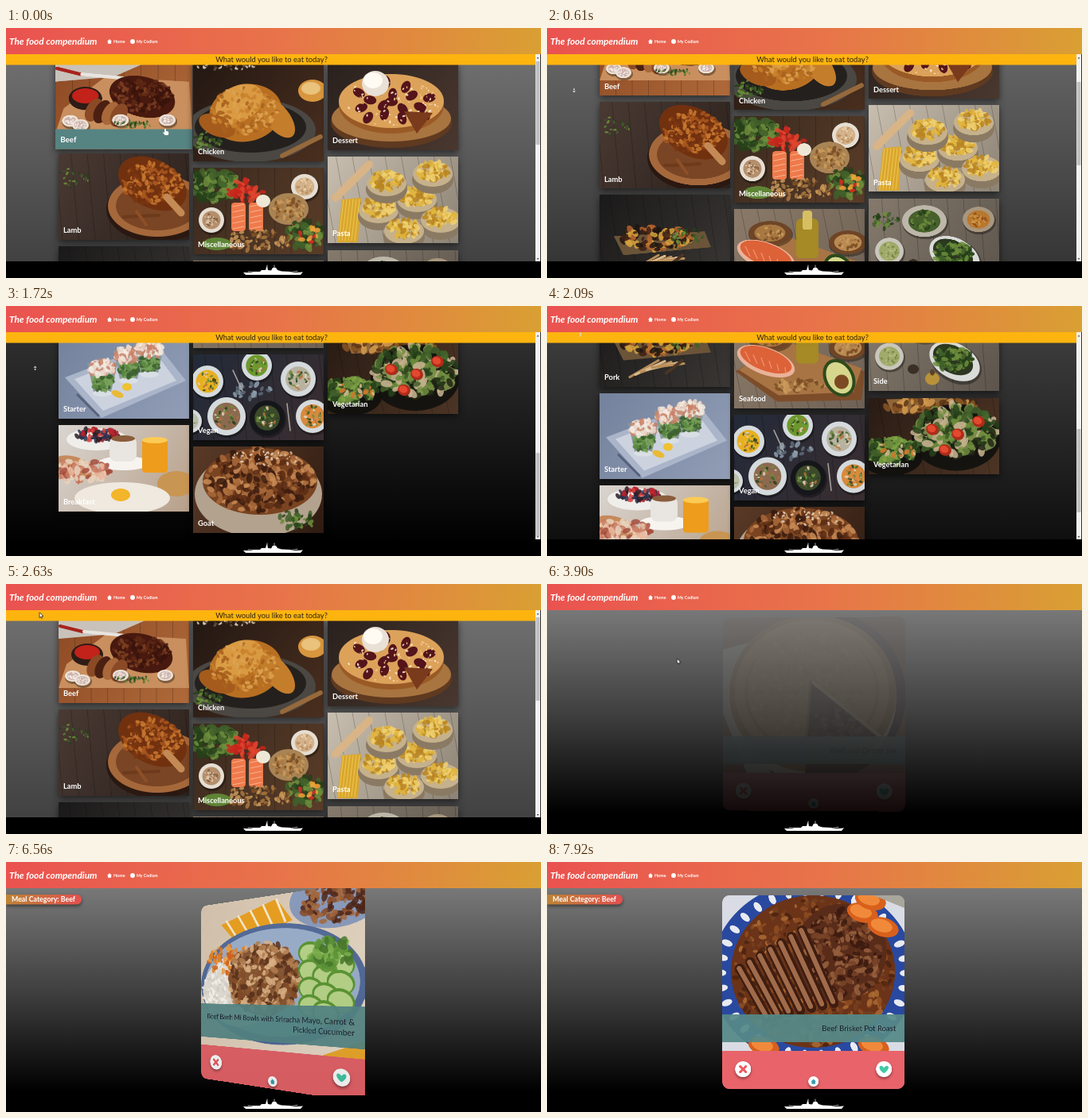
Animation, 672 px wide and 315 px high, one loop 7990 ms. Source, as an HTML page with a canvas:

```html
<!DOCTYPE html>
<html lang="en">
<head>
<meta charset="utf-8">
<title>The food compendium</title>
<style>
html, body { margin: 0; width: 100%; height: 100%; overflow: hidden; background: #000; }
canvas { display: block; width: 672px; height: 315px; }
</style>
</head>
<body>
<canvas id="stage"></canvas>
<script>
const W = 672, H = 315, LOOP = 7990, TOP = 33, FOOT = 294, SCALE = 2;
const FONT = 'Lato, "Open Sans", sans-serif';
const stage = document.getElementById('stage');
const dpr = Math.max(1, window.devicePixelRatio || 1);
stage.width = W * dpr;
stage.height = H * dpr;
const screen = stage.getContext('2d');
screen.scale(dpr, dpr);
let g = screen, seed = 1;

// --- drawing helpers, all on the current context g ---
function rnd() { seed = seed * 16807 % 2147483647; return seed / 2147483647; }
function box(color, x, y, w, h, r = 0) {
  g.fillStyle = color;
  g.beginPath();
  g.roundRect(x, y, w, h, r);
  g.fill();
}
function oval(color, x, y, rx, ry = rx, turn = 0) {
  g.fillStyle = color;
  g.beginPath();
  g.ellipse(x, y, rx, ry, turn, 0, 7);
  g.fill();
}
function poly(color, ...p) {
  g.fillStyle = color;
  g.beginPath();
  for (let i = 0; i < p.length; i += 2) g.lineTo(p[i], p[i + 1]);
  g.closePath();
  g.fill();
}
function line(color, width, x1, y1, x2, y2) {
  g.strokeStyle = color;
  g.lineWidth = width;
  g.lineCap = 'round';
  g.beginPath();
  g.moveTo(x1, y1);
  g.lineTo(x2, y2);
  g.stroke();
}
function shade(x1, y1, x2, y2, ...colors) {
  const s = g.createLinearGradient(x1, y1, x2, y2);
  colors.forEach((c, i) => s.addColorStop(i / (colors.length - 1), c));
  return s;
}
function specks(colors, n, x, y, rx, ry, size) {
  g.globalAlpha = 0.85;
  for (let i = 0; i < n * 2; i++) {
    const a = rnd() * 6.283, d = Math.sqrt(rnd()), s = size * (0.35 + rnd() * 0.5);
    oval(colors[i % colors.length], x + Math.cos(a) * d * rx, y + Math.sin(a) * d * ry, s, s * 0.6, rnd() * 3.14);
  }
  g.globalAlpha = 1;
}
function bowl(rim, food, bits, x, y, rx, ry = rx) {
  oval('rgba(0,0,0,.35)', x + 1, y + 2, rx + 1, ry + 1);
  oval(rim, x, y, rx, ry);
  oval(food, x, y, rx * 0.72, ry * 0.72);
  specks(bits, 16, x, y, rx * 0.6, ry * 0.6, rx * 0.15);
}
function planks(a, b, w, h, slant = 0) {
  box(shade(0, 0, w, h, a, b), 0, 0, w, h);
  for (let i = 0; i < 9; i++) line('rgba(0,0,0,.25)', 0.8, i * w / 8 - slant, 0, i * w / 8 + slant, h);
}
function write(str, x, y, size, color, weight = 400, align = 'left') {
  g.font = `${weight} ${size}px ${FONT}`;
  g.fillStyle = color;
  g.textAlign = align;
  g.textBaseline = 'middle';
  g.fillText(str, x, y);
}
function sheet(w, h, draw) {
  const c = document.createElement('canvas'), back = g;
  c.width = w * SCALE;
  c.height = h * SCALE;
  g = c.getContext('2d');
  g.scale(SCALE, SCALE);
  seed = 77;
  draw(w, h);
  g = back;
  return c;
}

// --- category pictures ---
const GREENS = ['#41602a', '#6d8d3c', '#26401a'], MEAT = ['#8a4a26', '#4b2012', '#a9683a'];
const NUTS = ['#a87842', '#c99a5c', '#7a4d25'];
const pictures = {
  Beef(w, h) {
    planks('#8d4a25', '#b06a3a', w, h);
    poly('#c9c2ba', 0, 0, 120, 0, 70, 22, 0, 28);
    poly('#c98f5e', 10, 60, 60, 22, 160, 28, 164, 90, 0, 90);
    line('#a8231d', 4, 2, 12, 30, 19);
    line('#e8e4df', 4, 32, 19, 84, 24);
    oval('#2e1c16', 36, 48, 20, 14);
    oval('#c2221a', 36, 45, 16, 9);
    oval('#48190f', 104, 46, 40, 24, 0.25);
    specks(['#5d2814', '#3a140c', '#7d4022'], 70, 104, 44, 36, 20, 5);
    for (let i = 0; i < 4; i++) oval(MEAT[i % 3], 46 + i * 10, 62 + i * 2, 9, 15, 0.5);
    for (const [x, y] of [[18, 75], [78, 74], [134, 74], [30, 80]]) bowl('#eee3d8', '#cdb3ad', ['#f8f2ea'], x, y, 10, 7);
    specks(GREENS, 18, 92, 79, 25, 4, 3);
  },
  Lamb(w, h) {
    planks('#4a3a33', '#2c211d', w, h, 5);
    oval('#2a1811', 124, 70, 64, 42);
    oval('#a5683b', 124, 66, 62, 39);
    oval('#7a4524', 124, 66, 52, 31);
    oval('#71310f', 118, 38, 46, 30, 0.5);
    specks(['#a8571f', '#c9792f', '#7a3612'], 90, 118, 38, 38, 26, 5);
    line('#c48a55', 9, 136, 55, 154, 75);
    line('#6d3a1c', 4, 82, 80, 126, 78);
    line('#8d4f27', 4, 98, 73, 110, 90);
    specks(GREENS, 14, 20, 30, 22, 14, 3);
  },
  Pork(w, h) {
    planks('#1b1a1a', '#3a3734', w, h, 8);
    poly('#6b5438', 18, 52, 132, 46, 140, 66, 30, 76);
    specks(['#b4642d', '#d6a23c', '#3d2014', '#1f1512'], 50, 70, 54, 46, 15, 8);
    specks(GREENS, 16, 110, 52, 20, 10, 4);
    for (let i = 0; i < 5; i++) line(i % 2 ? '#d9b98a' : '#b98d5a', 3, 38 + i * 7, 97 - i * 3, 74 + i * 8, 76 + i);
    line('#4a3524', 4, 84, 92, 104, 76);
  },
  Starter(w, h) {
    box(shade(0, 0, w, h, '#74829d', '#929eb6'), 0, 0, w, h);
    poly('#aab5ca', 8, 56, 122, 12, 160, 60, 54, 107);
    poly('#ccd3df', 20, 58, 118, 20, 148, 60, 56, 98);
    for (const [x, y] of [[88, 32], [114, 24], [55, 48]]) {
      poly('#8b9a9c', x - 19, y - 10, x + 19, y - 10, x + 11, y + 26, x - 11, y + 26);
      oval('#d9dfe4', x, y + 28, 12, 4);
      specks(['#5c8a42', '#3d6230', '#7ba35a'], 34, x, y + 13, 13, 11, 6);
      specks(['#ead8cb', '#c9826a', '#f5ebe1'], 46, x, y - 4, 17, 10, 6);
    }
    oval('#f0c232', 86, 68, 6, 5);
    oval('#e9ba35', 74, 77, 8, 4, 0.4);
    line('#56617a', 3, 24, 78, 50, 104);
  },
  Breakfast(w, h) {
    box(shade(0, 0, w, h, '#dad5d0', '#b7a08a'), 0, 0, w, h);
    oval('#f0eeea', 48, 18, 38, 14);
    specks(['#b3202c', '#27304f', '#d8433f', '#2c1d26'], 34, 48, 12, 28, 8, 6);
    oval('#f7f4f0', 82, 48, 32, 9);
    box('#e9e5e0', 64, 14, 34, 32, 9);
    oval('#8b5d3c', 81, 17, 15, 4);
    box('#ee9c1c', 105, 18, 32, 42, 4);
    oval('#fccb55', 121, 19, 16, 4);
    oval('#c58a5c', 20, 52, 26, 12, 0.3);
    specks(['#c97b62', '#e9b79c', '#a44e3d', '#e8d3bd'], 40, 30, 58, 34, 14, 8);
    oval('#c99553', 148, 74, 24, 16);
    oval('#efe9df', 80, 92, 60, 20);
    oval('#f3b529', 78, 88, 12, 8);
  },
  Chicken(w, h) {
    box(shade(0, 0, w, h, '#231813', '#4a2f1f'), 0, 0, w, h);
    specks(['#6b5242', '#d8cbb8'], 20, 40, 7, 38, 5, 3);
    oval('#4b4742', 72, 88, 82, 40);
    oval('#24201d', 72, 84, 70, 32);
    oval('#b86f22', 66, 66, 46, 36, -0.2);
    oval('#d99a42', 58, 54, 32, 22, -0.5);
    oval('#c47d2b', 106, 72, 30, 15, 0.9);
    oval('#a55b1c', 30, 82, 24, 13, 0.4);
    specks(['#dca250', '#a8621f', '#c9812d'], 70, 64, 64, 42, 30, 5);
    oval('#d8963e', 150, 38, 18, 14);
    oval('#e9c27b', 148, 35, 12, 8);
    specks(GREENS, 26, 18, 102, 20, 12, 4);
    line('#96693c', 6, 112, 120, 160, 96);
  },
  Miscellaneous(w, h) {
    planks('#3a2a1f', '#5b3d28', w, h);
    specks(GREENS, 60, 26, 22, 30, 20, 9);
    specks(['#c9251b', '#e2452f'], 18, 66, 30, 22, 14, 7);
    bowl('#e6ded2', '#d4b28a', ['#ead2ae', '#b98d62'], 140, 24, 17, 16);
    bowl('#e6ded2', '#b58f6c', ['#e4cfb0', '#7c573b'], 23, 66, 16, 16);
    oval('#a98455', 120, 52, 25, 20);
    specks(NUTS, 40, 120, 52, 19, 14, 5);
    for (const x of [48, 70]) {
      box('#ef7a4c', x, 44, 18, 36, 4);
      for (let i = 0; i < 5; i++) line('#f8b08d', 1, x + 2, 49 + i * 7, x + 16, 46 + i * 7);
    }
    oval('#eee7d6', 88, 42, 9, 8);
    specks(GREENS, 34, 140, 84, 24, 18, 8);
    specks(['#d42d22', '#e6a438'], 8, 146, 84, 14, 10, 6);
    specks(NUTS, 40, 82, 92, 44, 13, 5);
    oval('#5f8436', 30, 96, 18, 8);
  },
  Seafood(w, h) {
    planks('#8b7a69', '#6f6255', w, h, 12);
    poly('#7d4d2a', 2, 72, 60, 34, 164, 72, 160, 108, 54, 110);
    poly('#a87444', 6, 70, 60, 32, 160, 68, 150, 98, 56, 102);
    bowl('#6e4526', '#a87842', NUTS, 45, 30, 27, 15);
    bowl('#6e4526', '#b98a52', NUTS, 143, 42, 24, 15);
    box('#a58a25', 78, 12, 28, 50, 6);
    box('#d6bf62', 86, 2, 12, 24, 3);
    oval('#e9b39a', 40, 59, 38, 17, 0.35);
    oval('#dd6238', 40, 57, 34, 14, 0.35);
    for (let i = 0; i < 6; i++) line('#ee9470', 1.2, 14 + i * 10, 47 + i * 4, 20 + i * 9, 59 + i * 3);
    oval('#2e4a1c', 132, 80, 19, 25, -0.5);
    oval('#d6d78c', 132, 80, 15, 21, -0.5);
    oval('#7c4a22', 135, 85, 9);
    specks(NUTS, 30, 82, 90, 30, 8, 6);
  },
  Vegan(w, h) {
    planks('#232a39', '#3a2e30', w, h, 6);
    const foods = ['#e8b021', '#6d9a2e', '#b8b2a0', '#8c6a50', '#3c4a2b', '#d98a3c', '#b8bfa8'];
    [[18, 34, 20], [80, 14, 19], [132, 31, 22], [42, 78, 24], [93, 80, 22], [150, 78, 21], [-4, 84, 15]].forEach(([x, y, r], i) => {
      const dark = i === 4;
      bowl(dark ? '#15161a' : '#d5dadd', foods[i], [...GREENS, '#b8703a', '#e0d4b8'], x, y, r);
    });
    specks(['#8fa0ad', '#5d6b79'], 10, 72, 46, 26, 10, 6);
    line('#a8a49d', 1.5, 50, 20, 62, 46);
    line('#a8a49d', 1.5, 118, 62, 122, 96);
  },
  Goat(w, h) {
    box(shade(0, 0, w, h, '#5a3a27', '#2f1c12'), 0, 0, w, h);
    oval('#b3a28e', 82, 60, 80, 54);
    oval('#7a4421', 84, 44, 72, 42);
    specks(['#a8683a', '#5a2c14', '#c98c56', '#3a1b0e'], 130, 84, 42, 68, 40, 8);
    specks(['#e5d5c0', '#d2b695'], 20, 92, 14, 44, 10, 3);
    specks(GREENS, 20, 130, 92, 24, 12, 6);
  },
  Dessert(w, h) {
    box(shade(0, 0, w, h, '#2a211e', '#4a382f'), 0, 0, w, h);
    oval('#5f3a20', 80, 74, 76, 32);
    oval('#a87440', 80, 69, 75, 29);
    oval('#9a5a26', 80, 52, 66, 36);
    oval('#dca25a', 80, 47, 66, 34);
    for (let i = 0; i < 17; i++) {
      const a = i * 2.4, d = Math.sqrt(i / 17);
      oval('#54141a', 80 + Math.cos(a) * d * 56, 48 + Math.sin(a) * d * 27, 8, 5.5, a);
    }
    specks(['#f0c88c', '#fff0d8'], 40, 80, 48, 60, 30, 2.5);
    poly('#7a3a1c', 96, 60, 132, 62, 112, 88);
    oval('#e9e0d6', 60, 25, 17, 16);
    oval('#fffaf2', 57, 21, 12, 10);
  },
  Pasta(w, h) {
    planks('#c9bfb0', '#8d8375', w, h, 10);
    line('#d8b486', 10, 10, 52, 52, 10);
    poly('#d9a62e', 18, 54, 42, 52, 38, 108, 12, 108);
    for (let i = 0; i < 6; i++) line('#f0c850', 1, 20 + i * 4, 54, 14 + i * 4, 106);
    for (const [x, y] of [[64, 66], [112, 52], [142, 78], [96, 92], [74, 32], [132, 20]]) {
      oval('#8b7a63', x, y + 9, 26, 18);
      oval('#c5b18c', x, y + 2, 25, 16);
      specks(['#e0b53f', '#f0d070', '#b98522'], 44, x, y - 2, 20, 12, 6);
    }
  },
  Side(w, h) {
    planks('#857a6c', '#5d554d', w, h, 4);
    bowl('#c9c6bb', '#a0aa6a', ['#b5bb80', '#75833f'], 26, 66, 18, 17);
    oval('rgba(0,0,0,.35)', 110, 75, 34, 24, 0.5);
    oval('#d9dbd8', 108, 72, 34, 22, 0.5);
    oval('#2d3620', 106, 70, 27, 17, 0.5);
    specks(GREENS, 60, 106, 69, 24, 15, 6);
    oval('#b8923a', 80, 94, 9, 8);
    oval('#5b4326', 80, 86, 3, 4);
    oval('#3a3025', 56, 82, 7, 6);
    bowl('#bdb7aa', '#47602c', GREENS, 70, 28, 28, 20);
    bowl('#a8977f', '#b9782f', ['#d09a45', '#8f4b1c'], 138, 26, 20, 16);
    specks(GREENS, 14, 20, 28, 18, 10, 5);
  },
  Vegetarian(w, h) {
    planks('#2a1c14', '#4d3525', w, h, 9);
    poly('#8f6638', 22, 2, 100, 0, 80, 18, 30, 20);
    specks(['#d39a4e', '#8b5523', '#5d3517'], 30, 76, 10, 60, 9, 9);
    oval('#15130f', 110, 50, 56, 42);
    specks([...GREENS, '#82964e', '#cdb594', '#1e2414'], 130, 110, 42, 52, 32, 10);
    for (const [x, y] of [[112, 46], [138, 30], [96, 66], [80, 40]]) {
      oval('#b02a1a', x, y, 8, 7, 0.4);
      oval('#e2492f', x - 1, y - 1, 5.5, 4.5, 0.4);
    }
    oval('#12110e', 28, 74, 40, 24);
    specks([...GREENS, '#7fa544'], 60, 28, 66, 34, 15, 9);
    specks(['#d2752b', '#d8bc94'], 8, 34, 66, 26, 10, 6);
  }
};

const columns = [
  [66, [['Beef', 41, 109], ['Lamb', 158, 109], ['Pork', 275, 109], ['Starter', 392, 108], ['Breakfast', 508, 109]]],
  [235, [['Chicken', 41, 127], ['Miscellaneous', 176, 109], ['Seafood', 293, 118], ['Vegan', 419, 108], ['Goat', 535, 109]]],
  [404, [['Dessert', 45, 109], ['Pasta', 162, 109], ['Side', 280, 109], ['Vegetarian', 398, 96]]]
];
const tiles = columns.flatMap(([x, list]) =>
  list.map(([name, y, h]) => ({ name, x, y, h, w: 164, art: sheet(164, h, pictures[name]) })));

// --- meal cards ---
const CARD = { x: 221, y: 42, w: 229, h: 244 };
function heart(x, y, s, color) {
  g.fillStyle = color;
  g.beginPath();
  g.moveTo(x, y + s);
  g.bezierCurveTo(x - s * 2.2, y - s * 0.5, x - s * 0.8, y - s * 1.7, x, y - s * 0.45);
  g.bezierCurveTo(x + s * 0.8, y - s * 1.7, x + s * 2.2, y - s * 0.5, x, y + s);
  g.fill();
}
function house(x, y, s, color) {
  poly(color, x - s, y, x, y - s, x + s, y, x + s * 0.7, y, x + s * 0.7, y + s * 0.9, x - s * 0.7, y + s * 0.9, x - s * 0.7, y);
}
function button(x, y, r) {
  g.shadowColor = 'rgba(0,0,0,.4)';
  g.shadowBlur = 6;
  g.shadowOffsetY = 4;
  oval('#fff', x, y, r);
  g.shadowColor = 'transparent';
}
function mealCard(lines, picture) {
  return sheet(CARD.w, CARD.h, (w, h) => {
    g.beginPath();
    g.roundRect(0, 0, w, h, 9);
    g.clip();
    picture();
    box('#e8646a', 0, 196, w, 48);
    const band = 35 + 12 * (lines.length - 1);
    box('rgba(86,137,136,.93)', 0, 185 - band, w, band);
    lines.forEach((s, i) => write(s, 218, 168 - 12 * (lines.length - 1 - i), 9.5, '#1d2430', 400, 'right'));
    button(26, 219, 10);
    line('#ee5a5f', 3, 22.5, 215.5, 29.5, 222.5);
    line('#ee5a5f', 3, 29.5, 215.5, 22.5, 222.5);
    button(203, 219, 10);
    heart(203, 219.5, 4.8, '#42c9a5');
    button(114.5, 234.5, 6.5);
    house(114.5, 234.8, 3.3, '#3c9fae');
  });
}
const meals = [
  mealCard(['Beef and Oyster pie'], () => {
    box(shade(0, 0, 229, 196, '#7a4a2c', '#8f5531'), 0, 0, 229, 196);
    poly('#5a301c', 150, 0, 229, 0, 229, 60);
    poly('#cfc7c0', 0, 40, 40, 30, 60, 196, 30, 196, 0, 120);
    oval('#2a1713', 124, 98, 106, 106);
    oval('#e0d2bd', 112, 102, 106, 104);
    oval('#b57330', 113, 96, 105, 99);
    oval('#d29a4c', 112, 93, 97, 90);
    oval('#b87a33', 112, 94, 84, 78);
    oval('#d8a355', 112, 92, 81, 76);
    specks(['#e3b76e', '#c58a40', '#dca75a'], 170, 104, 85, 74, 66, 5);
    poly('#3b1a10', 111, 80, 196, 152, 170, 196, 104, 196);
    specks(['#5d2b18', '#251009', '#83482a'], 70, 142, 146, 32, 34, 7);
    line('#ecc887', 4, 111, 80, 198, 150);
    line('#9c622c', 3, 111, 80, 105, 160);
  }),
  mealCard(['Beef Banh Mi Bowls with Sriracha Mayo, Carrot &', 'Pickled Cucumber'], () => {
    box(shade(0, 0, 229, 196, '#dac7b0', '#eee0cd'), 0, 0, 229, 196);
    poly('#f0a21c', 35, 30, 120, 5, 142, 34, 62, 58);
    for (let i = 0; i < 5; i++) line('#fff0d2', 3, 44 + i * 19, 26 - i * 5, 64 + i * 17, 54 - i * 5);
    oval('#8b9dbf', 194, 14, 56, 34);
    specks(MEAT, 60, 196, 16, 44, 25, 8);
    oval('#536c9c', 116, 112, 116, 76);
    oval('#9eb2d0', 116, 110, 108, 68);
    oval('#e9e4dc', 62, 120, 58, 48);
    specks(['#fffdf5', '#ded8cb'], 60, 36, 120, 34, 34, 5);
    specks(['#ef8524', '#d9661a', '#f4a346'], 40, 48, 78, 34, 20, 7);
    oval('#8a5732', 100, 106, 52, 46);
    specks(['#5d3219', '#8a4f28', '#b98250', '#e5b98a'], 150, 100, 104, 54, 46, 8);
    for (let i = 0; i < 11; i++) {
      const x = 166 + i % 3 * 18, y = 76 + i * 7;
      oval('#5c9a32', x, y, 17, 14, 0.4);
      oval('#bcd98a', x, y + 1, 14.5, 11.5, 0.4);
    }
    specks(['#5f9a35', '#82b84e', '#477a28'], 30, 190, 78, 24, 18, 10);
    poly('#efab2c', 180, 196, 229, 176, 229, 196);
  }),
  mealCard(['Beef Brisket Pot Roast'], () => {
    box('#d9dce4', 0, 0, 229, 196);
    oval('#2949a0', 114, 98, 128, 116);
    for (let i = 0; i < 34; i++) {
      const a = i * 0.185;
      oval('#e8eaf2', 114 + Math.cos(a) * 116, 98 + Math.sin(a) * 104, 7, 4, a);
    }
    oval('#6b3318', 114, 96, 103, 96);
    specks(['#8d4d22', '#ab6a33', '#4d2310', '#75401f'], 260, 114, 98, 100, 92, 7);
    oval('#592c1a', 148, 72, 58, 62, 0.3);
    specks(['#7a4429', '#3c1b10', '#96603d'], 130, 150, 74, 50, 56, 7);
    for (let i = 0; i < 7; i++) {
      line('#3f1d10', 12, 22 + i * 13, 92 - i * 8, 56 + i * 14, 154 - i * 3);
      line('#a06b4b', 6, 21 + i * 13, 92 - i * 8, 55 + i * 14, 152 - i * 3);
    }
    for (const [x, y] of [[176, 22], [202, 40], [186, 6], [52, 190], [190, 190]]) {
      oval('#d9601c', x, y, 20, 12, 0.3);
      oval('#f08a3a', x - 2, y - 2, 14, 8, 0.3);
    }
    poly('#a9a69c', 190, 0, 229, 0, 229, 16);
  })
];

// --- motion ---
const clamp = v => Math.max(0, Math.min(1, v));
const span = (t, a, b) => clamp((t - a) / (b - a));
const ease = v => v * v * (3 - 2 * v);
function track(keys, t) {
  let i = 0;
  while (i < keys.length - 2 && t > keys[i + 1][0]) i++;
  const [a, b] = [keys[i], keys[i + 1]], k = span(t, a[0], b[0]);
  return a.slice(1).map((v, n) => v + (b[n + 1] - v) * k);
}
const scrollKeys = [[0, 0], [300, 0], [600, 60], [1100, 277], [1350, 358], [1800, 358], [2090, 283], [2630, 0]];
const mouseKeys = [
  [0, 200, 130], [60, 200, 130], [300, 60, 85], [450, 34, 72], [1100, 34, 99], [1540, 34, 99], [2090, 42, 36],
  [2630, 42, 36], [2830, 42, 44], [3100, 145, 92], [3570, 162, 95], [3700, 163, 94], [3900, 163, 94],
  [4640, 390, 188], [5030, 390, 188], [5450, 414, 200], [5560, 424, 258]
];
// each spin: card, start, end, fading in or out
const spins = [
  [0, 3870, 4780, true], [0, 5490, 5860, false], [1, 5860, 6370, true],
  [1, 6460, 7050, false], [2, 7050, 7930, true]
];

function drawTile(tile, scroll, hover) {
  const y = tile.y - scroll, s = 1 + 0.05 * hover;
  if (y > FOOT + 10 || y + tile.h < TOP) return;
  g.save();
  g.translate(tile.x + tile.w / 2, y + tile.h / 2);
  g.scale(s, s);
  g.translate(-tile.w / 2, -tile.h / 2);
  g.shadowColor = 'rgba(0,0,0,.55)';
  g.shadowBlur = 9;
  g.shadowOffsetY = 3;
  g.drawImage(tile.art, 0, 0, tile.w, tile.h);
  g.shadowColor = 'transparent';
  g.globalAlpha = hover;
  box('#568482', 0, tile.h - 24, tile.w, 24);
  g.globalAlpha = 1;
  write(tile.name, 6, tile.h - 11.5, 9.3, '#fff', 700);
  g.restore();
}

function drawMenu(t) {
  const [scroll] = track(scrollKeys, t);
  const hover = t < 2000 ? 1 - ease(span(t, 60, 330)) : ease(span(t, 2950, 3130));
  box(shade(0, TOP - scroll, 0, 660 - scroll, '#707070', '#000'), 0, TOP, W, FOOT - TOP);
  tiles.forEach(tile => drawTile(tile, scroll, tile.name === 'Beef' ? hover : 0));
  box('#fdb40f', 0, TOP, 665, 13.4);
  write('What would you like to eat today?', 333.5, 40.3, 9.4, '#2a2110', 400, 'center');
  box('#f1f1f1', 665, TOP, 6, FOOT - TOP);
  box('#333', 671, TOP, 1, FOOT - TOP);
  poly('#555', 666.5, 38.5, 669.5, 38.5, 668, 36.5);
  poly('#555', 666.5, 290, 669.5, 290, 668, 292);
  box('#c1c1c1', 665.5, 42 + scroll * 0.4, 5, 105);
}

function drawSpin(art, angle, alpha) {
  const depth = 424, mid = CARD.x + CARD.w / 2, cy = CARD.y + CARD.h / 2, half = CARD.w / 2;
  const c = Math.cos(angle), s = Math.sin(angle);
  g.globalAlpha = alpha;
  if (Math.abs(s) < 0.001) g.drawImage(art, CARD.x, CARD.y, CARD.w, CARD.h);
  else for (let x = -125; x < 125; x++) {
    const px = x + 0.5, u = px * depth / (c * depth + px * s), zoom = depth / (depth - u * s);
    if (Math.abs(u) >= half || zoom <= 0) continue;
    const sx = Math.min((u + half) * SCALE, art.width - 1), h = CARD.h * zoom;
    g.drawImage(art, sx, 0, 1, art.height, Math.floor(mid) + x, cy - h / 2, 1, h);
  }
  g.globalAlpha = 1;
}

function drawMeals(t) {
  const slide = ease(span(t, 3900, 4500));
  if (slide > 0) {
    const x = -100 * (1 - slide);
    g.shadowColor = 'rgba(0,0,0,.5)';
    g.shadowBlur = 4;
    g.shadowOffsetY = 2;
    box(shade(x, 0, x + 95, 0, '#bd8437', '#e2504f'), x, 41, 95, 12.5, [0, 6, 6, 0]);
    g.shadowColor = 'transparent';
    write('Meal Category: Beef', x + 7, 47.7, 8.8, '#fff', 700);
  }
  const spin = spins.filter(s => t >= s[1]).pop();
  if (!spin) return;
  const [card, from, to, entering] = spin, k = ease(span(t, from, to));
  const alpha = entering ? clamp(0.08 + k * 0.92) : 1 - k;
  drawSpin(meals[card], k * Math.PI * 2, alpha);
}

function drawShip() {
  poly('#fff', 298, 308, 312, 308.5, 360, 308.5, 373, 307.5, 370, 311, 301, 311);
  poly('#fff', 308, 309, 311, 307, 319, 307, 321, 305, 326, 305, 327.5, 300, 329, 305,
    333, 305.5, 335, 302, 339, 302, 341, 305, 346, 306.5, 357, 307, 362, 309);
  line('#fff', 0.7, 337, 303, 337, 299);
  line('#fff', 0.7, 328, 305, 328, 299);
  line('#fff', 0.7, 304, 307, 311, 307.5);
  line('#fff', 0.7, 359, 307.5, 366, 306.5);
}

function drawFrame() {
  g.shadowOffsetY = 0;
  box(shade(0, 0, W, 60, '#ea5250', '#e8734a', '#d9a033'), 0, 0, W, TOP);
  write('The food compendium', 4, 17.5, 11.8, '#fff', 'italic 700');
  house(130, 17, 3, '#fff');
  write('Home', 135, 17.2, 5.4, '#fff', 700);
  oval('#fff', 159, 17, 2.9);
  write('My Codlum', 164, 17.2, 5.2, '#fff', 700);
  box('#000', 0, FOOT, W, H - FOOT);
  drawShip();
}

function drawMouse(t) {
  if (t > 5800) return;
  const [x, y] = track(mouseKeys, t);
  g.save();
  g.translate(x, y);
  if (t < 200 || (t > 3000 && t < 3300)) {
    box('#fff', -0.8, -3, 1.8, 6, 0.9);
    box('#fff', -1, 0, 5.2, 5, 1.6);
    line('#fff', 1.4, -2, 2, 0, 4);
  } else if (t > 450 && t < 2630) {
    const d = t < 1700 ? 1 : -1;
    oval('#ddd', 0, -d * 1.5, 1);
    poly('#ddd', -2, d * 0.5, 2, d * 0.5, 0, d * 2.8);
  } else {
    g.lineWidth = 0.8;
    g.strokeStyle = '#222';
    poly('#fff', 0, 0, 0, 6.5, 1.5, 5.2, 2.6, 7.4, 3.6, 6.9, 2.6, 4.8, 4.6, 4.6);
    g.stroke();
  }
  g.restore();
}

function render(t) {
  const swap = span(t, 3260, 3540);
  g.clearRect(0, 0, W, H);
  if (swap < 1) drawMenu(t);
  if (swap > 0) {
    g.globalAlpha = swap;
    box(shade(0, TOP, 0, 290, '#787878', '#404040', '#000'), 0, TOP, W, FOOT - TOP);
    g.globalAlpha = 1;
    drawMeals(t);
  }
  drawFrame();
  drawMouse(t);
}

const start = performance.now();
function tick() {
  render((performance.now() - start) % LOOP);
  requestAnimationFrame(tick);
}
tick();
</script>
</body>
</html>
```
